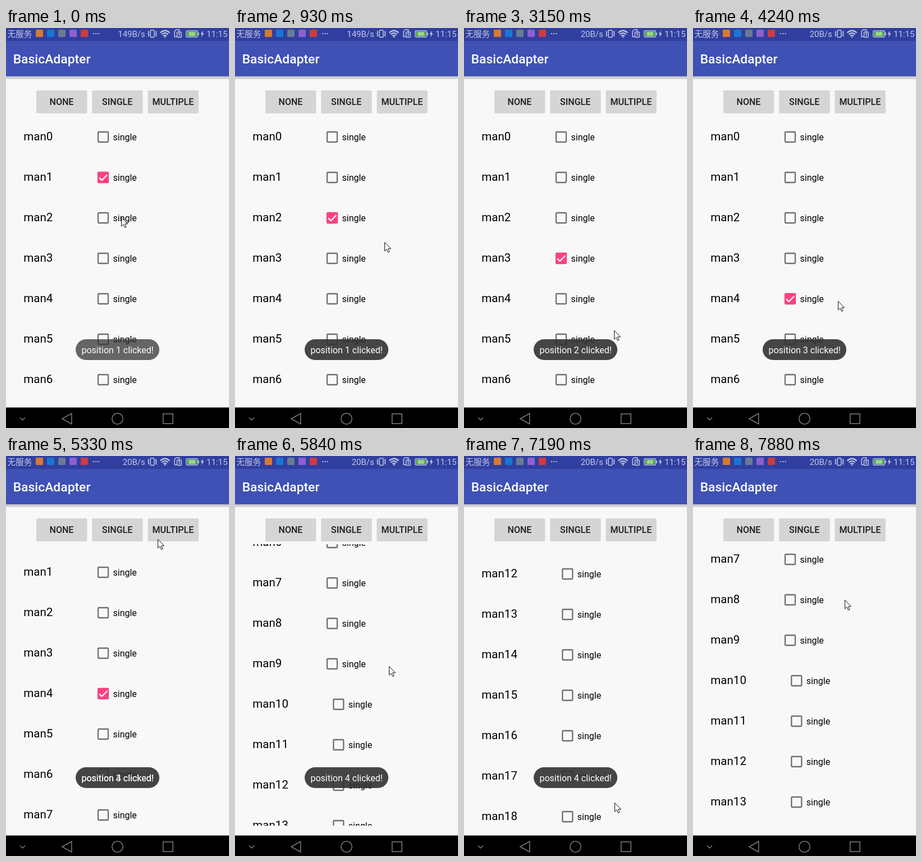
Write an HTML page that moves like this. It is 397 px wide and 712 px high and loops after 8000 ms.

```html
<!DOCTYPE html>
<html lang="en">
<head>
<meta charset="utf-8">
<title>BasicAdapter</title>
<style>
  html, body { margin: 0; width: 100%; height: 100%; overflow: hidden; background: #f8f8f8; }
  svg { display: block; font-family: Roboto, sans-serif; }
  .title { font-size: 22.86px; font-weight: 500; fill: #fff; }
  .button { font-size: 16px; font-weight: 500; fill: #1c1c1c; text-anchor: middle; }
  .name { font-size: 20.57px; }
  .label { font-size: 16px; }
  .status { font-size: 15px; fill: #c3c8e6; }
  .carrier { font-family: "Noto Sans CJK SC", "Noto Sans CJK", sans-serif; font-size: 14.6px; }
  .line { fill: none; stroke: #c3c8e6; stroke-width: 1.5; }
  .nav { fill: none; stroke: #747474; stroke-width: 1.6; }
  .toast { font-size: 16px; fill: #fff; }
</style>
</head>
<body>
<svg width="397" height="712" viewBox="0 0 397 712">
  <defs>
    <clipPath id="listArea"><rect y="157" width="397" height="501"/></clipPath>
    <linearGradient id="shade" x2="0" y2="1">
      <stop stop-color="#c6c6c6"/><stop offset="1" stop-color="#d9d9d9"/>
    </linearGradient>
  </defs>
  <rect width="397" height="712" fill="#f8f8f8"/>
  <rect y="86" width="397" height="5" fill="url(#shade)"/>
  <rect y="22" width="397" height="64" fill="#3f51b5"/>
  <rect width="397" height="23" fill="#303f9f"/>
  <text class="title" x="12.7" y="63">BasicAdapter</text>

  <g id="statusBar">
    <text class="status carrier" x="2.5" y="16">无服务</text>
    <g id="notices"></g>
    <path d="M155 10h2m2.300 0h2m2.300 0h2" stroke="#c3c8e6" stroke-width="2"/>
    <text id="speed" class="status" x="247.8" y="15.5" text-anchor="end"></text>
    <g class="line">
      <rect x="257.2" y="4" width="6.6" height="12.6" rx="1"/>
      <path d="M253 5.5l1.5 2-1.5 2.5 1.5 2.5-1.5 2.5M268 5.5l-1.5 2 1.5 2.5-1.5 2.5 1.5 2.5"/>
      <path d="M274.5 8.5Q283 .8 291.5 8.5M277.3 11.5Q283 6.3 288.7 11.5M280 14Q283 11.5 286 14" stroke-width="2.1"/>
      <path d="M304 15.5H300V6L303 3H308.5V6"/>
      <rect x="304.5" y="7" width="7.5" height="9.5" rx="1"/>
      <path d="M307 10L308.5 9V14.5"/>
      <rect x="320.7" y="5" width="20.6" height="11" rx="1.5" stroke-width="1.3"/>
      <path d="M342.8 8V13"/>
    </g>
    <circle cx="283" cy="15.8" r="1.4" fill="#c3c8e6"/>
    <rect x="322.2" y="6.5" width="17.6" height="8" fill="#62b946"/>
    <text x="331" y="14" font-size="9.5" fill="#fff" text-anchor="middle">88</text>
    <path d="M350.5 4.5L346.5 11H349L347.8 16.5L352.5 9.5H349.8Z" fill="#c3c8e6"/>
    <text class="status" x="357" y="15.5">11:15</text>
  </g>

  <g id="buttons"></g>
  <g clip-path="url(#listArea)"><g id="list"></g></g>

  <g id="toast">
    <rect x="124" y="554" width="149" height="37" rx="18.5" fill="#323232" fill-opacity=".9"/>
    <g id="messages"></g>
  </g>

  <rect y="675.5" width="397" height="37"/>
  <g class="nav">
    <path d="M25 693.5L29.5 697.8L34 693.5"/>
    <path d="M100 695.5L116.8 686.2V704.8Z"/>
    <circle cx="198.5" cy="695.5" r="9.7"/>
    <rect x="279.7" y="686.8" width="17.4" height="17.4"/>
  </g>
  <path id="cursor" d="M.5.5V16L4 12.7L6.5 18.3L9 17.2L6.6 11.8H11.5Z" fill="#fff" stroke="#111"/>
</svg>
<script>
const LOOP = 8000, TICK = 133, LAST = 59;
const ROW = 72, ITEMS = 20, TOAST_GAP = 13.35, TOAST_END = 57, SPEED_CHANGE = 21;
const clicks = [3, 20, 28];

// Eased moves: start, end, then where the move arrives.
const cursorMoves = [
  [0, 0, 205, 337], [3, 6, 267, 380], [6, 15, 248, 411], [19, 24, 269, 553],
  [26, 29, 258, 486], [32, 35, 301, 550], [37, 40, 270, 148], [42, 46, 278, 600],
  [46, 48, 257, 194], [50, 53, 268, 617], [54, 59, 270, 256]
];
const flings = [[38.7, 44.7, 490], [46.15, 53, 848], [54, 59, 514]];

const $ = id => document.getElementById(id);
const clamp = v => Math.max(0, Math.min(1, v));
const ease = u => u * u * (3 - 2 * u);

function glide(moves, k, col) {
  let v = 0;
  for (const move of moves) {
    const [from, to] = move;
    const u = to > from ? clamp((k - from) / (to - from)) : 1;
    v += (move[col] - v) * ease(u);
  }
  return Math.round(v);
}

function listRow(i) {
  const y = 194 + i * ROW, dx = i > 9 ? 11.3 : 0;
  return `<text class="name" x="31.3" y="${y + 6}">man${i}</text>
    <g transform="translate(${173 + dx} ${y})">
      <rect x="-9" y="-9" width="18" height="18" rx="1.3" fill="none" stroke="#707070" stroke-width="2.3"/>
      <g class="tick">
        <rect x="-10" y="-10" width="20" height="20" rx="2.3" fill="#ff4081"/>
        <path d="M-7 .4L-2.4 5L7.2 -4.6" fill="none" stroke="#fff" stroke-width="2.2"/>
      </g>
    </g>
    <text class="label" x="${190.5 + dx}" y="${y + 6}">single</text>`;
}

$("notices").innerHTML = ["#d9792f", "#1976d2", "#6b7b93", "#8e5fd0", "#d03a40"]
  .map((c, i) => `<rect x="${53 + i * 20}" y="3" width="13" height="13" rx="1.5" fill="${c}"/>`).join("");
$("buttons").innerHTML = ["NONE", "SINGLE", "MULTIPLE"]
  .map((text, i) => `<rect x="${54 + i * 99.2}" y="111" width="90.4" height="41" rx="2" fill="#d5d5d5"/>
    <text class="button" x="${99 + i * 99.2}" y="137">${text}</text>`).join("");
$("list").innerHTML = Array.from({ length: ITEMS }, (_, i) => listRow(i)).join("");
$("messages").innerHTML = [1, 2, 3, 4]
  .map(n => `<text class="toast" x="134.5" y="578.5">position ${n} clicked!</text>`).join("");

const ticks = [...document.querySelectorAll(".tick")];
const messages = [...$("messages").children];

function draw(k) {
  const move = (id, x, y) => $(id).setAttribute("transform", `translate(${x} ${y})`);
  move("cursor", glide(cursorMoves, k, 2), glide(cursorMoves, k, 3));
  move("list", 0, -glide(flings, k, 2));
  $("speed").textContent = k < SPEED_CHANGE ? "149B/s" : "20B/s";

  const checked = 1 + clicks.filter(c => c <= k).length;
  ticks.forEach((el, i) => el.setAttribute("visibility", i === checked ? "visible" : "hidden"));

  $("toast").setAttribute("opacity", clamp(.82 + k * .18) * clamp((TOAST_END - k) / 3));
  messages.forEach((el, i) => {
    const begin = i * TOAST_GAP;
    const end = i < messages.length - 1 ? begin + TOAST_GAP : TOAST_END;
    el.setAttribute("opacity", clamp(k - begin + 1) * clamp(end + 1 - k));
  });
}

const start = performance.now();
function frame() {
  const t = (performance.now() - start) % LOOP;
  draw(Math.min(LAST, Math.floor((t + 20) / TICK)));
  requestAnimationFrame(frame);
}
frame();
</script>
</body>
</html>
```
